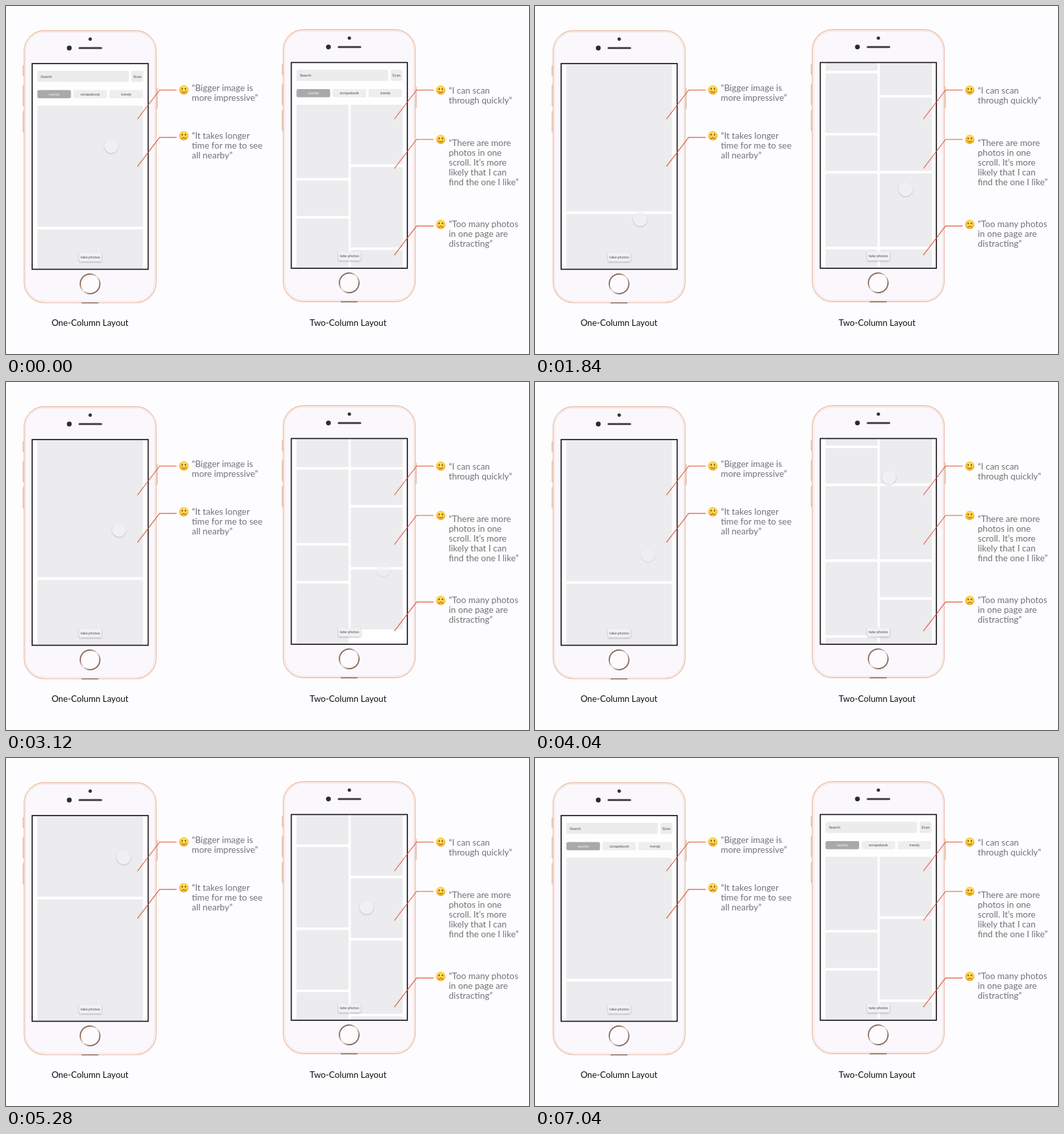
Recreate the animation shown at these times as an HTML page. Size 800x532 px, loop 7.08 s.

```html
<!DOCTYPE html>
<html lang="en">
<head>
<meta charset="utf-8">
<title>One-column and two-column layouts</title>
<style>
  html, body { margin: 0; width: 100%; height: 100%; overflow: hidden; background: #fdfcfe; }
  svg { display: block; width: 800px; height: 532px; }
  .note { font: 13.5px Lato, sans-serif; fill: #737275; }
  .caption { font: 13.25px Lato, sans-serif; fill: #111; text-anchor: middle; }
  .ui { font: 5.7px Roboto, sans-serif; fill: #555; }
  .mid { text-anchor: middle; }
  .light { fill: #f2f2f2; }
  .card { fill: #ecebed; }
  .tab { fill: #eeedef; }
  .tab.on { fill: #a9a8aa; }
  .frame { fill: none; stroke: #1b1a1d; stroke-width: 1.7; }
  .metal { fill: #f8e6dc; stroke: #dcab93; stroke-width: .9; }
  .callout { fill: none; stroke: #dc5a43; stroke-width: 1.15; }
  .touch { fill: #f0eff1; stroke: #f6f5f7; stroke-width: .8; filter: drop-shadow(0 1px .8px rgba(0,0,0,.2)); }
  .photo { fill: #f1f0f2; filter: drop-shadow(0 1px 1.2px rgba(0,0,0,.28)); }
</style>
</head>
<body>
<svg id="stage" viewBox="0 0 800 532">
  <defs>
    <clipPath id="screen"><rect x="40" y="88" width="177.5" height="314.5"/></clipPath>
    <linearGradient id="ring" x1="0" y1="0" x2=".5" y2=".5" spreadMethod="reflect">
      <stop offset="0" stop-color="#7d5d50"/><stop offset=".5" stop-color="#8d6d5f"/>
      <stop offset="1" stop-color="#efe4df"/>
    </linearGradient>
    <radialGradient id="face" cx=".5" cy=".35" r=".7">
      <stop offset="0" stop-color="#ffe66b"/><stop offset=".6" stop-color="#fccb3d"/>
      <stop offset="1" stop-color="#ee9c25"/>
    </radialGradient>
  </defs>
</svg>
<script>
const LOOP = 7080, TOP = 152.5, GAP = 4;
// Photo shapes, height over width: wide, squarish, portrait, tall.
const RATIO = { w: .68, s: 1.146, p: 1.408, t: 1.547 };

const rect = (x, y, w, h, r, attrs) =>
  `<rect x="${x}" y="${y}" width="${w}" height="${h}" rx="${r}" ${attrs}/>`;
const text = (x, y, s, cls) => `<text x="${x}" y="${y}" class="${cls}">${s}</text>`;

function column(x, w, shapes) {
  let y = TOP;
  return [...shapes].map(shape => {
    const h = w * RATIO[shape], card = rect(x, y, w, h, 1.5, 'class="card"');
    y += h + GAP;
    return card;
  }).join('');
}

function header() {
  const tabs = ['nearby', 'scrapebook', 'trendy'].map((name, i) => {
    const x = 48 + i * 55.1;
    return rect(x, 128.5, 51.4, 12.6, 2.5, `class="tab ${i ? '' : 'on'}"`) +
      text(x + 25.7, 136.8, name, i ? 'ui mid' : 'ui mid light');
  });
  return rect(48, 99, 140, 17, 2, 'class="card"') + text(53, 109.8, 'Search', 'ui') +
    rect(192, 99, 18, 17, 2, 'class="card"') + text(201, 109.8, 'Scan', 'ui mid') + tabs.join('');
}

function phone(id, dx, dy, cards) {
  const button = (x, y, h) => rect(x, y, 2.4, h, 1, 'class="metal"');
  return `<g transform="translate(${dx} ${dy})">
    ${button(26, 91, 16)}${button(26, 121, 32)}${button(26, 161, 32)}${button(229, 125, 32)}
    ${rect(27.8, 37.8, 201.8, 415.8, 31, 'fill="#fff" stroke="#e8bfaa" stroke-width="1.4"')}
    ${rect(29.9, 39.9, 197.6, 411.6, 29, 'fill="#fbf8fd" stroke="#f6e3da" stroke-width="1.2"')}
    ${rect(115.5, 453, 26, 1.6, .5, 'fill="#81695d"')}
    <circle cx="128.8" cy="50.6" r="2.6" fill="#353436"/>
    <circle cx="96.8" cy="64.2" r="3.7" fill="#2c2b2e"/>
    ${rect(111, 62.8, 36, 3, 1.5, 'fill="#414043"')}
    <circle cx="128.6" cy="424.8" r="15" fill="#fdfbfe" stroke="url(#ring)" stroke-width="1.9"/>
    ${rect(40, 88, 177.5, 314.5, 0, 'fill="#fefeff"')}
    <g clip-path="url(#screen)"><g id="${id}">${header()}${cards}</g></g>
    ${rect(111.8, 376.8, 34.6, 14, 2.5, 'class="photo"')}
    ${text(129, 385.8, 'take photos', 'ui mid')}
    ${rect(40, 88, 177.5, 314.5, 0, 'class="frame"')}
  </g>`;
}

function face(x, y, happy) {
  const mouth = happy ? 'M-3.4 2.2Q0 5.6 3.4 2.2' : 'M-3.1 4.5Q0 1 3.1 4.5';
  const eye = x => `<ellipse cx="${x}" cy="-1.6" rx=".95" ry="1.35" fill="#6d4218"/>`;
  return `<g transform="translate(${x} ${y})"><circle r="7.2" fill="url(#face)"/>${eye(-2.4)}${eye(2.4)}
    <path d="${mouth}" fill="none" stroke="#7b4b1a" stroke-width="1" stroke-linecap="round"/></g>`;
}

// A bent leader line, a face and a quote.
function note(x, y, faceY, textY, happy, lines) {
  return `<path class="callout" d="M${x} ${y + 44.5}L${x + 34} ${y}H${x + 60}"/>` +
    face(x + 71, faceY, happy) +
    lines.map((s, i) => text(x + 83.3, textY + i * 15, s, 'note')).join('');
}

document.getElementById('stage').innerHTML +=
  phone('left', 0, 0, column(48, 161.5, 'ssptps')) +
  phone('right', 396.4, -1.6, column(48, 79.5, 'pwtsswppwp') + column(131, 79.5, 'stspppwss')) +
  note(201, 128.5, 128.3, 129.5, true, ['“Bigger image is', 'more impressive”']) +
  note(201, 200.8, 198.3, 202.5, false, ['“It takes longer', 'time for me to see', 'all nearby”']) +
  note(594, 128.5, 128.5, 134, true, ['“I can scan', 'through quickly”']) +
  note(594, 204, 204, 213.5, true, ['“There are more', 'photos in one', 'scroll. It’s more',
    'likely that I can', 'find the one I like”']) +
  note(594, 336.3, 333.8, 338.3, false, ['“Too many photos', 'in one page are', 'distracting”']) +
  text(128.5, 489, 'One-Column Layout', 'caption') +
  text(523.3, 489, 'Two-Column Layout', 'caption') +
  '<circle id="leftTouch" class="touch" r="10.3"/><circle id="rightTouch" class="touch" r="10.3"/>';

// Swipes: press time, finger x, finger y, page offset when pressed.
const swipes = {
  left: [[-160, 161, 214, 0], [600, 161, 330, 0], [1680, 161, 326, 444], [2960, 173, 226, 713.5],
    [3960, 173, 264, 707.5], [5120, 180, 152, 314.5], [5960, 178, 429, -30.3]],
  right: [[100, 560, 340, 0], [1680, 567, 280, 444], [3040, 577, 286, 682],
    [3880, 541.5, 146, 541], [5120, 551.5, 228, 189], [5960, 558.5, 268.5, 16]]
};
const FADE = 160, DRAG = 840, SETTLE = 560, GRIP = .4;

const clamp = v => Math.min(1, Math.max(0, v));
const ease = p => p * p * (3 - 2 * p);

// The finger presses, drags the page towards its next offset, then lifts.
function pose(list, t) {
  const i = list.findLastIndex(s => s[0] <= t);
  if (i < 0) return { offset: 0, x: 0, y: 0, alpha: 0 };
  const [press, x, y, from] = list[i];
  const [next, , , to] = list[i + 1] || [press + SETTLE, 0, 0, 0];
  const offset = from + (to - from) * ease(clamp((t - press - FADE) / (next - press - FADE)));
  const lift = Math.min(press + DRAG, next - FADE);
  const alpha = clamp((t - press) / FADE) * clamp((lift + FADE - t) / FADE);
  return { offset, x, y: y + GRIP * (from - offset), alpha };
}

function draw(t) {
  for (const id in swipes) {
    const { offset, x, y, alpha } = pose(swipes[id], t);
    document.getElementById(id).setAttribute('transform', `translate(0 ${-offset})`);
    const dot = document.getElementById(id + 'Touch');
    dot.setAttribute('cx', x);
    dot.setAttribute('cy', y);
    dot.setAttribute('opacity', alpha);
  }
}

const start = performance.now();
function tick() {
  draw((performance.now() - start) % LOOP);
  requestAnimationFrame(tick);
}
tick();
</script>
</body>
</html>
```
